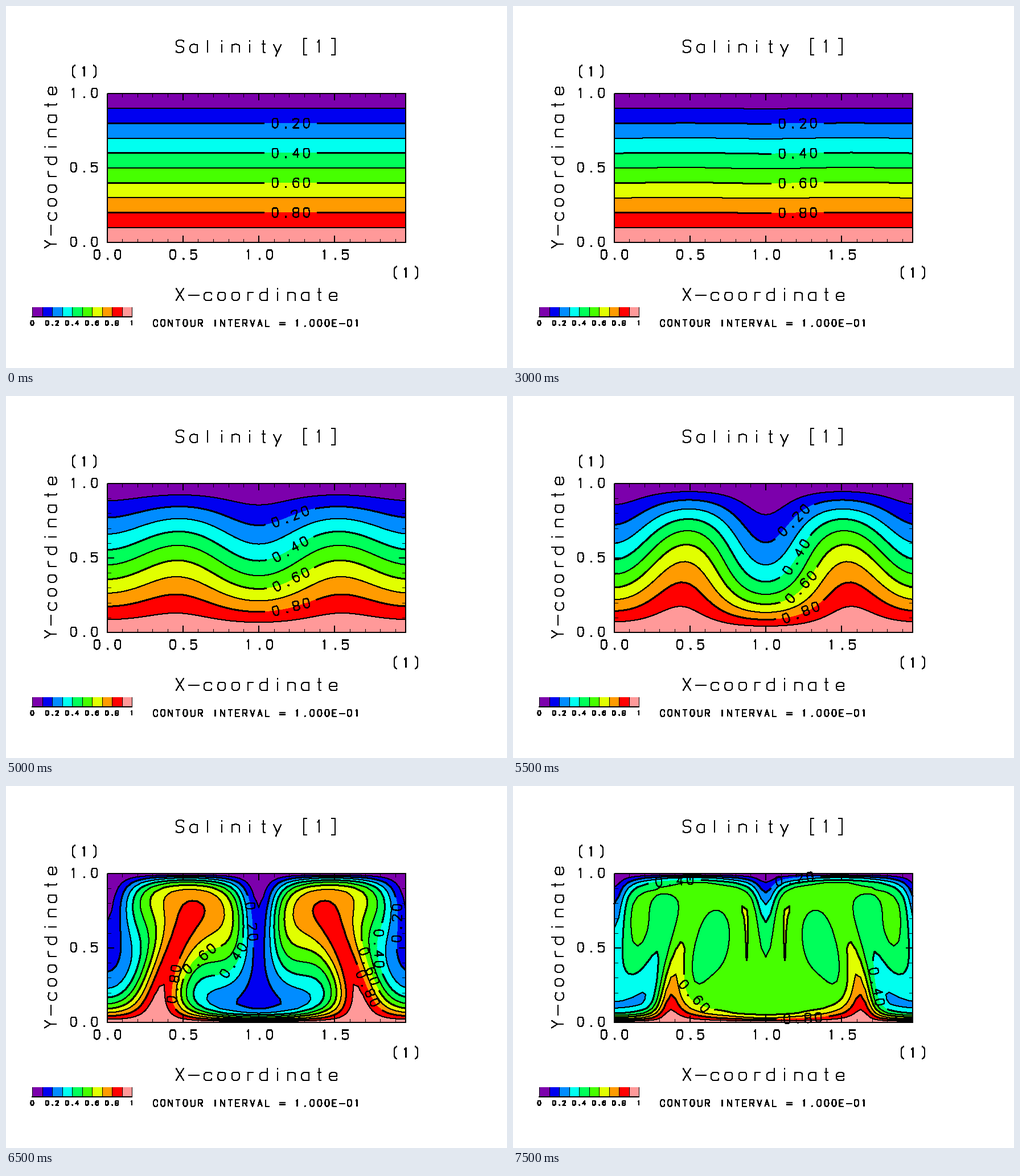
A matplotlib script for the animation above (8000 ms loop, 880 by 637 pixels).

```python
import numpy as np
import matplotlib.pyplot as plt
from matplotlib.animation import ArtistAnimation
from matplotlib.patches import Rectangle

W, H, DPI = 880, 637, 100
FRAMES, INTERVAL = 16, 500
LEFT, RIGHT, TOP, BOTTOM = 177.5, 702, 154, 416
X_UNIT, Y_UNIT = 266.5, 262
COLORS = ["#7c00ac", "#0000f0", "#008cff", "#00fff0", "#00ff5a",
          "#46ff00", "#e1ff00", "#ff9b00", "#ff0000", "#ff9999"]
LEVELS = np.arange(1, 10) / 10

# Convection between free-slip plates, Prandtl number 1, on a grid of period 2.
N = 64
RAYLEIGH = 7e4
LINEAR_UNTIL = 8
STEPS = 100
kx = np.pi * np.fft.fftfreq(N, 1 / N)[None, :]
ky = np.pi * np.fft.fftfreq(N, 1 / N)[:, None]
k2 = kx ** 2 + ky ** 2
k2[0, 0] = 1
KEEP = (abs(kx) < np.pi * N / 3) & (abs(ky) < np.pi * N / 3)
grid_x = np.arange(N)[None, :] * 2 / N
grid_y = np.arange(N)[:, None] * 2 / N


def growth_rate(k):
    total = k ** 2 + np.pi ** 2
    return np.sqrt(RAYLEIGH * k ** 2 / total) - total


FRAME_TIME = np.log(2.28) / growth_rate(2 * np.pi)


def small_wave(i):
    """Salinity anomaly while the two unstable modes still grow freely."""
    t = (i - LINEAR_UNTIL) * FRAME_TIME
    short = 0.0162 * np.exp(growth_rate(2 * np.pi) * t) * np.cos(2 * np.pi * grid_x)
    long = 0.0086 * np.exp(growth_rate(np.pi) * t) * np.cos(np.pi * grid_x)
    return (long - short) * np.sin(np.pi * grid_y)


def rate(state):
    theta, omega = state
    psi = -omega / k2
    real = lambda f: np.fft.ifft2(f).real
    u, w = real(-1j * ky * psi), real(1j * kx * psi)
    advect = lambda f: KEEP * np.fft.fft2(u * real(1j * kx * f) + w * real(1j * ky * f))
    return np.array([1j * kx * psi - k2 * theta - advect(theta),
                     RAYLEIGH * 1j * kx * theta - k2 * omega - advect(omega)])


def step(state, h):
    a = rate(state)
    b = rate(state + h / 2 * a)
    c = rate(state + h / 2 * b)
    d = rate(state + h * c)
    return state + h / 6 * (a + 2 * b + 2 * c + d)


def salinity_frames():
    anomalies = [small_wave(i) for i in range(LINEAR_UNTIL + 1)]
    theta = KEEP * np.fft.fft2(anomalies[-1])
    omega = 1j * np.sqrt(RAYLEIGH * k2) * np.sign(kx) * theta
    state = np.array([theta, omega])
    while len(anomalies) < FRAMES:
        for _ in range(STEPS):
            state = step(state, FRAME_TIME / STEPS)
        anomalies.append(np.fft.ifft2(state[0]).real)
    rows = slice(0, N // 2 + 1)
    return [1 - grid_y[rows] + a[rows] for a in anomalies]


# Stroke font on a lattice: column letter, row sign; "~" rounds a path.
COLUMNS = dict(w=1, l=3.5, n=7, m=10, o=11.5, s=13, r=16.5, z=19)
ROWS = dict(q=-2, d=-1.2, b=0.5, k=1.7, h=2.6, t=3.4, e=5.5)
BOWL = "~r3 r4 l4 l0 r0 r1"
GLYPHS = {
    "0": "~m6 l6 l0 r0 r6 m6", "1": "n5 m6 m0", "2": "~l5 l6 r6 r4 l0;l0 r0",
    "4": "s0 s6 l2 r2", "5": "r6 l6 l3;~l3 l4 r4 r0 l0 l1",
    "6": "~r5 r6 l6 l0 r0 r4 l4 l2", "8": "~m6 l6 l3 r3 r6 m6;~m3 l3 l0 r0 r3 m3",
    ".": "m0 mb ob o0 m0", "-": "wh zh", "=": "wt zt;wk zk",
    "(": "~s7 n6 n0 sd", ")": "~n7 s6 s0 nd", "[": "s7 n7 nd sd", "]": "n7 s7 sd nd",
    "S": "~r5 r6 l6 l3 r3 r0 l0 l1", "X": "l6 r0;r6 l0", "Y": "l6 m3 r6;m3 m0",
    "C": "~r4 r6 l6 l0 r0 r2", "O": "~m6 l6 l0 r0 r6 m6", "N": "l0 l6 r0 r6",
    "T": "l6 r6;m6 m0", "U": "~l6 l2 l0 r0 r2 r6",
    "R": "l0 l6 m6;~m6 r6 r3 m3;l3 m3 r0", "I": "m6 m0", "E": "r6 l6 l0 r0;l3 s3",
    "V": "l6 m0 r6", "A": "l0 m6 r0;n2 s2", "L": "l6 l0 r0",
    "a": "r4 r0;" + BOWL, "c": BOWL, "d": "r6 r0;" + BOWL,
    "e": "l2 r2;~r2 r4 l4 l0 r0 r1", "i": "m4 m0;m6 me", "l": "m6 m0",
    "n": "l4 l0;~l2 l4 r4 r2 r0", "o": "~m4 l4 l0 r0 r4 m4", "r": "n4 n0;~n2 n4 r4",
    "t": "m6 m1;~m1 m0 s0;n4 s4", "y": "l4 m0;r4 nq",
}

fig = plt.figure(figsize=(W / DPI, H / DPI), dpi=DPI, facecolor="white")
ax = fig.add_axes([0, 0, 1, 1])
ax.set(xlim=(0, W), ylim=(H, 0))
ax.axis("off")


def stroke(x, y, width=1.0, z=5):
    return ax.plot(x, y, color="black", lw=width * 72 / DPI, antialiased=False,
                   solid_capstyle="butt", zorder=z)[0]


def soften(p):
    """Cut the corners of a polyline until it looks round."""
    for _ in range(3):
        cuts = np.stack([0.75 * p[:-1] + 0.25 * p[1:], 0.25 * p[:-1] + 0.75 * p[1:]], axis=1)
        p = np.vstack([p[:1], cuts.reshape(-1, 2), p[-1:]])
    return p


def glyph_paths(char):
    for path in filter(None, GLYPHS.get(char, "").split(";")):
        points = np.array([(COLUMNS[c], 3.5 * float(ROWS.get(r, r)))
                           for c, r in path.strip("~").split()])
        yield soften(points) if path[0] == "~" else points


def write(text, cx, cy, unit, angle=0, width=1.2):
    """Draw a stroke-font string centred on (cx, cy)."""
    parts = []
    for i, char in enumerate(text):
        offset = (24 * (i - (len(text) - 1) / 2) - 10, -10.5)
        for path in glyph_paths(char):
            parts += [path + offset, [(np.nan, np.nan)]]
    x, y = np.vstack(parts).T * unit
    c, s = np.cos(np.radians(angle)), np.sin(np.radians(angle))
    return stroke(cx + c * x - s * y, cy - s * x - c * y, width)


def label_spots(length):
    """Places along a contour that carry its value, as arc lengths."""
    span = RIGHT - LEFT
    if length < 0.6 * span:
        return []
    if length < 1.3 * span:
        return [0.615 * length]
    return [0.35 * length] + ([0.93 * length] if length > 1.9 * span else [])


def draw_contour(points, level, bold):
    if points[0, 0] > points[-1, 0]:
        points = points[::-1]
    arc = np.r_[0, np.cumsum(np.hypot(*np.diff(points, axis=0).T))]
    at = lambda s: np.array([np.interp(s, arc, points[:, 0]), np.interp(s, arc, points[:, 1])])
    if not bold:
        return [stroke(*points.T, 1, 2)]
    s = np.linspace(0, arc[-1], int(arc[-1]) + 2)
    x, y = at(s)
    labels = []
    for spot in label_spots(arc[-1]):
        x[abs(s - spot) < 46] = np.nan
        a, b = at(spot - 27), at(spot + 27)
        if a[0] > b[0]:
            a, b = b, a
        angle = np.degrees(np.arctan2(a[1] - b[1], b[0] - a[0]))
        labels.append(write(f"{level:.2f}", *(a + b) / 2, 0.765, angle))
    return [stroke(x, y, 2, 2)] + labels


def draw_frame(field):
    x = LEFT + X_UNIT * grid_x[0]
    y = BOTTOM - Y_UNIT * grid_y[:len(field), 0]
    artists = [ax.contourf(x, y, field, levels=[-1, *LEVELS, 2], colors=COLORS,
                           antialiased=False, zorder=1)]
    lines = ax.contour(x, y, field, levels=LEVELS)
    for n, (level, segments) in enumerate(zip(LEVELS, lines.allsegs)):
        for points in segments:
            if len(points) > 1:
                artists += draw_contour(points, level, bold=n % 2 == 1)
    lines.remove()
    return artists


def draw_axes():
    stroke([LEFT, RIGHT, RIGHT, LEFT, LEFT], [TOP, TOP, BOTTOM, BOTTOM, TOP], 2)
    for n in range(1, 20):
        x, size = LEFT + X_UNIT * n / 10, 6 if n % 5 else 12
        width = 1 if n % 5 else 2
        stroke([x, x], [TOP, TOP + size], width)
        stroke([x, x], [BOTTOM, BOTTOM - size], width)
        if n < 10:
            y = BOTTOM - Y_UNIT * n / 10
            stroke([LEFT, LEFT + size], [y, y], width)
            stroke([RIGHT, RIGHT - size], [y, y], width)
    for n in range(4):
        write(f"{n / 2:.1f}", 178 + 133.3 * n, 437.5, 0.765)
    for n in range(3):
        write(f"{n / 2:.1f}", 137, 415 - 131 * n, 0.765)
    write("(1)", 137.5, 115, 0.765)
    write("(1)", 702.5, 469, 0.765)
    write("Salinity [1]", 440, 71, 1.02, width=1)
    write("X-coordinate", 440, 507.5, 1.02, width=1)
    write("Y-coordinate", 78, 284.5, 1.02, 90, width=1)
    write("CONTOUR INTERVAL = 1.000E-01", 439.5, 558, 0.546)


def draw_colorbar():
    x0, size, top, bottom = 46, 17.5, 530, 547
    for n, color in enumerate(COLORS):
        ax.add_patch(Rectangle((x0 + n * size, top), size, bottom - top, color=color,
                               lw=0, antialiased=False))
    for n in range(11):
        x = x0 + n * size
        stroke([x, x], [top, bottom], 1)
        if n % 2 == 0:
            write(f"{n / 10:g}", x, 558, 0.365, width=1.4)
    stroke([x0 - 1, x0 + 10 * size + 1], [bottom, bottom], 2)


draw_axes()
draw_colorbar()
anim = ArtistAnimation(fig, [draw_frame(field) for field in salinity_frames()],
                       interval=INTERVAL, repeat=True)
ax.set(xlim=(0, W), ylim=(H, 0))
plt.show()
```
